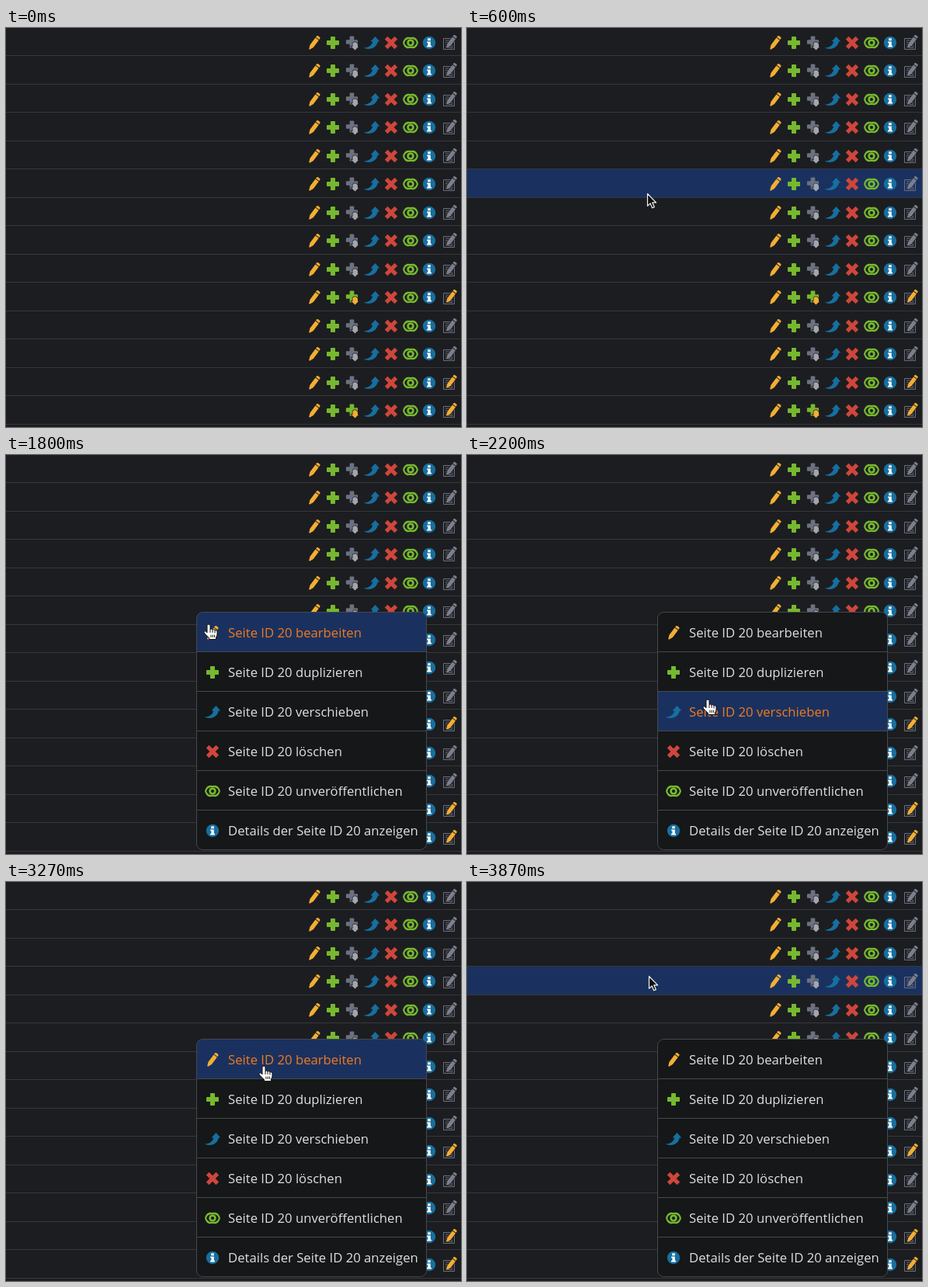
Recreate the animation shown at these times as an HTML page. Size 586 px wide and 514 px high, loop 4000 ms.

```html
<!DOCTYPE html>
<html lang="de">
<head>
<meta charset="utf-8">
<title>Kontextmenü</title>
<style>
  html, body { margin: 0; width: 100%; height: 100%; overflow: hidden; background: #1c1d20; }
  svg { display: block; }
  .row, .item { --bg: #1c1d20; }
  .item { --bg: #151718; }
  .band { fill: var(--bg); }
  .on { --bg: #1a315f; }
  text { font: 16.7px "Open Sans", "Noto Sans", sans-serif; fill: #e0e0e0; }
  .on text { fill: #f27a1c; }
</style>
</head>
<body>
<svg id="stage" width="586" height="514" viewBox="0 0 586 514">
  <defs>
    <g id="pen">
      <path transform="rotate(37)" d="M-2.7-7V-8.5Q-2.7-10-1.2-10H1.2Q2.7-10 2.7-8.5V-7ZM-2.7-6H2.7V5.5L.6 10.5H-.6L-2.7 5.5Z"/>
    </g>
    <path id="plus" d="M-2.2-8H2.2Q3-8 3-7V-3H7Q8-3 8-2.2V2.2Q8 3 7 3H3V7Q3 8 2.2 8H-2.2Q-3 8-3 7V3H-7Q-8 3-8 2.2V-2.2Q-8-3-7-3H-3V-7Q-3-8-2.2-8Z"/>
    <path id="move" d="M4.5-8L10.3-1.5H7.8C7 4 2 8-4 8C-7 8-9 7.5-10 6.3C-4 6.5 .2 3.5 1.2-1.5H-1.5Z"/>
    <path id="cross" transform="rotate(45)" d="M-2.6-9H2.6V-2.6H9V2.6H2.6V9H-2.6V2.6H-9V-2.6H-2.6Z"/>
    <g id="eye">
      <path fill-rule="evenodd" d="M-10 0C-7.5-9-2.5-7 0-7S7.5-9 10 0C7.5 9 2.5 7 0 7S-7.5 9-10 0ZM-7.8 0C-6-5-2.5-5 0-5S6-5 7.8 0C6 5 2.5 5 0 5S-6 5-7.8 0Z"/>
      <path fill-rule="evenodd" d="M-4.8 0A4.8 4.8 0 0 1 4.8 0A4.8 4.8 0 0 1-4.8 0ZM-2 0A2 2 0 0 0 2 0A2 2 0 0 0-2 0Z"/>
    </g>
    <g id="info">
      <circle r="8.2"/>
      <path fill="#fff" d="M-1.8-5.8H1.8V-2.8H-1.8ZM-2.8-1.6H1.8V3.8H3V5.6H-3V3.8H-1.6V.2H-2.8Z"/>
    </g>
    <path id="badge" d="M1 .5Q4-2 6.5 .5L7.5 2V5H8.5L4 9.5L-.5 5H1Z"/>
    <g id="sheet" fill="none" stroke="#6a6f7d">
      <path d="M-7.5-5.5H6.5V8.5H-7.5Z"/>
      <path d="M-5-3H4.5M-5-.5H4.5M-5 2H4.5M-5 4.5H4.5M-5 6.5H4.5" stroke-width="1.1"/>
    </g>
    <path id="arrow" d="M.5 .5V16.2L4.1 12.9L6.6 18.8L9.3 17.6L6.8 11.9H11.6Z"
      fill="#111" stroke="#f2f2f2" stroke-width="1.2" stroke-linejoin="round"/>
    <g id="hand" stroke="#111" stroke-linejoin="round" stroke-linecap="round">
      <path fill="#fff" d="M-2 10.5V1.8Q-2 0 0 0T2 1.8V6.5Q3.5 5.4 5 7Q6.7 6 8 7.7Q10.8 7.2 11 9.5V13Q11 15 9.5 17V19.5H.5V17.5Q-2.5 15-6 11Q-6.5 8.5-4.2 8.7Z"/>
      <path fill="none" d="M2 6.8V10.5M5 7.3V10.5M8 8V11M3 14V16.5M5.3 14V16.5M7.6 14V16.5"/>
    </g>
  </defs>
</svg>
<script>
const NS = 'http://www.w3.org/2000/svg';
const stage = document.getElementById('stage');
const C = { yellow: '#f3ae33', green: '#76b82f', gray: '#6c7180', pale: '#a2a5ac', blue: '#176f9f', red: '#cf463b' };
const LOOP = 4000, STEP = 1000 / 15, MENU_AT = 1200, PITCH = 36.5;

function add(parent, tag, attrs, text) {
  const el = parent.appendChild(document.createElementNS(NS, tag));
  for (const k in attrs) el.setAttribute(k, attrs[k]);
  if (text) el.textContent = text;
  return el;
}
function icon(parent, id, x, y, fill, extra = '') {
  return add(parent, 'use', { href: '#' + id, transform: `translate(${x} ${y}) ${extra}`, fill });
}
function outlined(parent, id, x, y, fill, extra) {
  const el = icon(parent, id, x, y, fill, extra);
  el.setAttribute('style', 'stroke:var(--bg);stroke-width:1.4;paint-order:stroke');
}

const rowTop = i => Math.floor(PITCH * i - 1);

function makeRow(i) {
  const g = add(stage, 'g', { class: 'row' });
  const top = rowTop(i), bottom = rowTop(i + 1), y = Math.floor(PITCH * i + 19);
  const copyOn = i === 9 || i === 13, editOn = copyOn || i === 12;
  add(g, 'rect', { class: 'band', x: 0, y: top + 1, width: 586, height: bottom - top - 1 });
  add(g, 'rect', { x: 0, y: bottom, width: 586, height: 1, fill: '#36383c' });
  icon(g, 'pen', 397, y, C.yellow);
  icon(g, 'plus', 421, y, C.green);
  icon(g, 'plus', 445.5, y - 1, copyOn ? C.green : C.gray, 'scale(.95)');
  outlined(g, 'badge', 445.5, y, copyOn ? C.yellow : C.pale);
  icon(g, 'move', 471, y, C.blue);
  icon(g, 'cross', 496, y, C.red);
  icon(g, 'eye', 521, y, C.green);
  icon(g, 'info', 545, y, C.blue);
  icon(g, 'sheet', 571, y, 'none');
  outlined(g, 'pen', 573.5, y - 1.5, editOn ? C.yellow : '#7b7f8b', 'scale(.95)');
  return g;
}

const entries = [
  ['pen', C.yellow, 'Seite ID 20 bearbeiten'],
  ['plus', C.green, 'Seite ID 20 duplizieren'],
  ['move', C.blue, 'Seite ID 20 verschieben'],
  ['cross', C.red, 'Seite ID 20 löschen'],
  ['eye', C.green, 'Seite ID 20 unveröffentlichen'],
  ['info', C.blue, 'Details der Seite ID 20 anzeigen']
];

const rows = Array.from({ length: 14 }, (_, i) => makeRow(i));

const clip = add(stage.querySelector('defs'), 'clipPath', { id: 'round' });
const frame = { x: 245.5, y: 202.5, width: 296, height: 306, rx: 8 };
add(clip, 'rect', frame);
const menu = add(stage, 'g', {});
const list = add(menu, 'g', { 'clip-path': 'url(#round)' });
const items = entries.map(([id, fill, label], i) => {
  const g = add(list, 'g', { class: 'item' }), y = 203 + 51 * i;
  add(g, 'rect', { class: 'band', x: 245, y: y - 1, width: 297, height: 52 });
  if (i) add(g, 'rect', { x: 245, y: y - 1, width: 297, height: 1, fill: '#45484d' });
  icon(g, id, 266, y + 26, fill);
  add(g, 'text', { x: 286, y: y + 32 }, label);
  return g;
});
add(menu, 'rect', { ...frame, fill: 'none', stroke: '#45484d' });

const arrow = add(stage, 'use', { href: '#arrow' });
const hand = add(stage, 'use', { href: '#hand' });

// Pointer path: time, x, y
const path = [
  [67, 148, 495], [200, 184, 346], [400, 213, 256], [600, 232, 213],
  [733, 245, 203], [1000, 246, 203], [1733, 246, 203], [1800, 261, 218],
  [2733, 343, 395], [2800, 343, 395], [3267, 332, 237], [3400, 300, 196], [3867, 234, 121]
];

// Monotone cubic interpolation, so pauses stay still
function slope(i, c) {
  const a = path[i - 1], b = path[i], d = path[i + 1];
  if (!a || !d) return 0;
  const m = (b[c] - a[c]) / (b[0] - a[0]), n = (d[c] - b[c]) / (d[0] - b[0]);
  return m * n > 0 ? 2 * m * n / (m + n) : 0;
}
function at(t, c) {
  const last = path.length - 1;
  if (t >= path[last][0]) return path[last][c];
  let i = 0;
  while (t >= path[i + 1][0]) i++;
  const p = path[i], q = path[i + 1], h = q[0] - p[0];
  const u = Math.max(0, (t - p[0]) / h), v = 1 - u;
  return v * v * (1 + 2 * u) * p[c] + u * u * (3 - 2 * u) * q[c]
    + h * u * v * (v * slope(i, c) - u * slope(i + 1, c));
}

const show = (el, on) => el.setAttribute('visibility', on ? 'visible' : 'hidden');
const mark = (els, k) => els.forEach((el, i) => el.classList.toggle('on', i === k));

function draw(ms) {
  const t = Math.round(Math.floor((ms + 4) / STEP) * STEP);
  const seen = t >= 67, open = t >= MENU_AT;
  const x = Math.round(at(t, 1)), y = Math.round(at(t, 2));
  const inside = open && x > 248 && y > 205;
  show(menu, open);
  show(arrow, seen && !inside);
  show(hand, inside);
  (inside ? hand : arrow).setAttribute('transform', `translate(${x} ${y})`);
  mark(rows, seen && !inside ? Math.floor((y + 1) / PITCH) : -1);
  mark(items, inside ? Math.floor((y - 203) / 51) : -1);
}

function tick() {
  draw(performance.now() % LOOP);
  requestAnimationFrame(tick);
}
tick();
</script>
</body>
</html>
```
